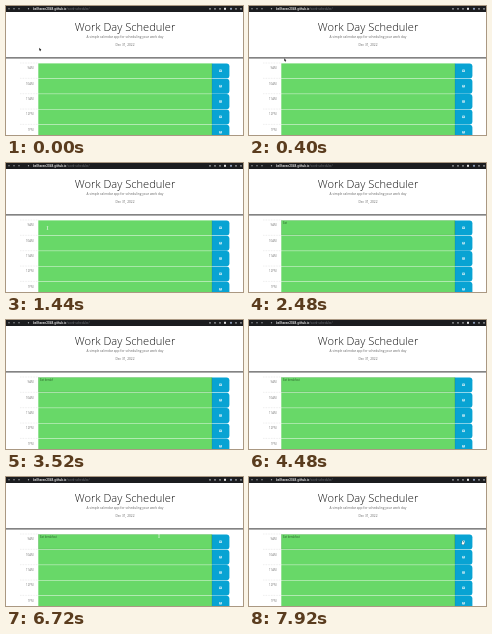
Animation, 237 px wide and 129 px high, one loop 8 s. Source, as an HTML page with a canvas:

```html
<!DOCTYPE html>
<html lang="en">
<head>
<meta charset="utf-8">
<title>Work Day Scheduler</title>
<style>
html, body { margin: 0; width: 100%; height: 100%; overflow: hidden; background: #fff; }
canvas { display: block; width: 237px; height: 129px; }
</style>
</head>
<body>
<canvas id="stage"></canvas>
<script>
const W = 237, H = 129, LOOP = 8000, STEP = 80;
const canvas = document.getElementById('stage');
const ctx = canvas.getContext('2d');
const dpr = window.devicePixelRatio || 1;
canvas.width = W * dpr;
canvas.height = H * dpr;

const SANS = '"Open Sans", sans-serif';
const UI = 'Roboto, sans-serif';
const GREEN = '#68d868', BLUE = '#08a3d3';
const CENTER = 119;
const ROW_TOP = 57, ROW_H = 15.35, GAP = 0.4, LEFT = 32.3, SPLIT = 206, RIGHT = 223.4;
const HOURS = ['9AM', '10AM', '11AM', '12PM', '1PM'];
const NOTE = 'Eat breakfast';

// Pointer path: time, x, y
const PATH = [
  [0, 34, 43], [80, 34, 43], [400, 36, 53.5], [880, 39, 61], [1440, 41.5, 65],
  [5520, 41.5, 65], [5760, 48, 64], [6400, 126, 60], [6720, 153, 59],
  [7280, 203, 63], [7520, 213, 65.5], [8000, 214, 65.5]
];
// Typing: time, characters shown
const TYPED = [[2080, 0], [2560, 4], [2880, 4], [3520, 10], [3840, 10], [4400, 13]];

function track(keys, t) {
  let i = 1;
  while (i < keys.length - 1 && t > keys[i][0]) i++;
  const a = keys[i - 1], b = keys[i];
  const k = Math.min(1, Math.max(0, (t - a[0]) / (b[0] - a[0])));
  return a.slice(1).map((v, n) => v + (b[n + 1] - v) * k);
}

function rect(x, y, w, h, color) {
  ctx.fillStyle = color;
  ctx.fillRect(x, y, w, h);
}

function dot(x, y, r, color) {
  ctx.fillStyle = color;
  ctx.beginPath();
  ctx.arc(x, y, r, 0, 7);
  ctx.fill();
}

function text(str, x, y, font, color, align = 'left') {
  ctx.font = font;
  ctx.fillStyle = color;
  ctx.textAlign = align;
  ctx.fillText(str, x, y);
  return ctx.measureText(str).width;
}

function drawBar() {
  rect(0, 0, W, 6, '#1b1c1f');
  [3, 8, 13].forEach(x => dot(x, 2.8, 0.8, '#8d9094'));
  dot(22.5, 2.8, 0.7, '#a5a8ac');
  const host = text('bellhaven2048.github.io', 27, 3.8, '500 3.1px ' + UI, '#f1f1f1');
  text('/work-scheduler/', 27 + host, 3.8, '3.1px ' + UI, '#6c7075');
  [204, 209, 214, 230, 235].forEach(x => dot(x, 2.8, 0.9, '#a0a3a7'));
  rect(218, 1.8, 2, 2, '#e4e4e4');
  dot(225, 2.8, 1.1, '#8fa0bd');
}

function drawHeader() {
  text('Work Day Scheduler', CENTER, 24.8, '300 11.1px ' + SANS, '#111', 'center');
  text('A simple calendar app for scheduling your work day', CENTER, 32, '3.2px ' + SANS, '#666', 'center');
  text('Dec 31, 2022', CENTER, 40, '3.2px ' + SANS, '#666', 'center');
  rect(0, 51.4, W, 1, '#333');
}

function drawDisk(x, y) {
  rect(x - 1.2, y - 1.2, 2.4, 2.4, '#e9f5fa');
  rect(x - 0.7, y - 0.8, 1.3, 0.6, BLUE);
  dot(x, y + 0.5, 0.35, BLUE);
}

function drawRow(hour, i) {
  const y = ROW_TOP + i * ROW_H, top = y + GAP, h = ROW_H - GAP;
  ctx.setLineDash([0.8, 0.8]);
  ctx.strokeStyle = '#bbb';
  ctx.lineWidth = 0.3;
  ctx.beginPath();
  ctx.moveTo(14, y);
  ctx.lineTo(LEFT, y);
  ctx.stroke();
  ctx.setLineDash([]);
  text(hour, 27.5, y + 6.2, '2.8px ' + SANS, '#777', 'right');
  rect(LEFT, top, SPLIT - LEFT, h, GREEN);
  ctx.fillStyle = BLUE;
  ctx.beginPath();
  ctx.roundRect(SPLIT, top, RIGHT - SPLIT, h, [0, 2.9, 2.9, 0]);
  ctx.fill();
  rect(SPLIT - 0.1, top, 0.2, h, '#17627a');
  drawDisk(214.5, y + 7.8);
}

function drawNote(t) {
  if (t < 1840) return;
  ctx.strokeStyle = 'rgba(0,50,0,.18)';
  ctx.lineWidth = 0.5;
  ctx.strokeRect(LEFT + 0.3, ROW_TOP + GAP + 0.3, SPLIT - LEFT - 0.6, ROW_H - GAP - 0.6);
  const count = Math.floor(track(TYPED, t)[0] + 0.001);
  text(NOTE.slice(0, count), 34, ROW_TOP + 4.2, '2.75px ' + SANS, '#2c632c');
}

function drawArrow(x, y) {
  ctx.beginPath();
  [[0, 0], [0, 3], [0.7, 2.4], [1.2, 3.4], [1.7, 3.1], [1.2, 2.2], [2.1, 2.1]]
    .forEach(([a, b]) => ctx.lineTo(x + a - 0.7, y + b - 1.2));
  ctx.closePath();
  ctx.fillStyle = '#111';
  ctx.fill();
}

function drawBeam(x, y) {
  rect(x - 0.35, y - 1.6, 0.7, 3.2, '#e4f6e4');
  rect(x - 0.8, y - 1.8, 1.6, 0.4, '#e4f6e4');
  rect(x - 0.8, y + 1.4, 1.6, 0.4, '#e4f6e4');
}

function drawHand(x, y) {
  ctx.fillStyle = '#fff';
  ctx.strokeStyle = '#222';
  ctx.lineWidth = 0.4;
  ctx.beginPath();
  ctx.roundRect(x - 1.1, y - 0.2, 2.6, 2.2, 0.7);
  ctx.roundRect(x - 0.6, y - 1.7, 0.9, 2.5, 0.4);
  ctx.stroke();
  ctx.fill();
}

function drawPointer(t, x, y) {
  if (t >= 2080 && t < 4880) return; // hidden while typing
  if (x >= SPLIT) drawHand(x, y);
  else if (x > LEFT && y > ROW_TOP) drawBeam(x, y);
  else drawArrow(x, y);
}

function draw(t) {
  const [x, y] = track(PATH, t);
  ctx.setTransform(dpr, 0, 0, dpr, 0, 0);
  rect(0, 0, W, H, '#fff');
  drawBar();
  drawHeader();
  HOURS.forEach(drawRow);
  drawNote(t);
  drawPointer(t, x, y);
}

const start = performance.now();
function tick() {
  const t = (performance.now() - start) % LOOP;
  draw(Math.floor(t / STEP) * STEP);
  requestAnimationFrame(tick);
}
tick();
</script>
</body>
</html>
```
